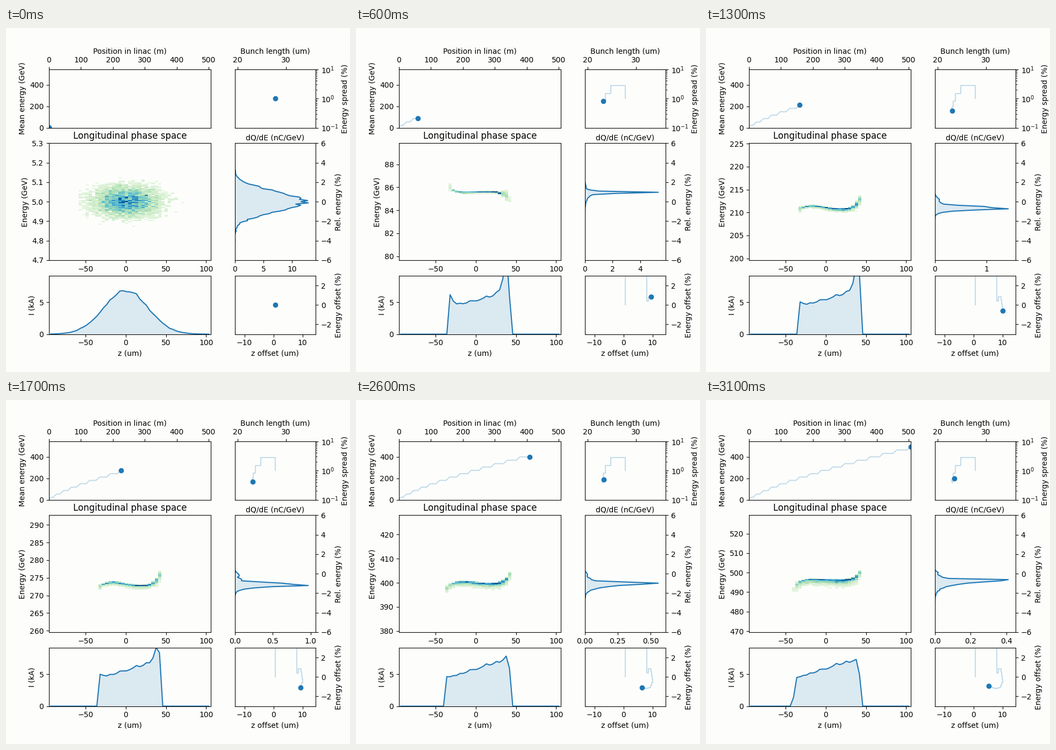
Write a matplotlib script that moves like this. It is 640 by 640 pixels and loops after 3.2 s.

```python
import numpy as np
import matplotlib.pyplot as plt
from matplotlib.animation import FuncAnimation

FRAMES, INTERVAL = 32, 100
BLUE, PAPER = "C0", "#fdfefc"
Z_LIM = (-95.8, 105.6)   # um
NZ, NE = 49, 99          # histogram cells
PARTICLES, CHARGE = 10000, 1.6

z_edges = np.linspace(*Z_LIM, NZ + 1)
rel_edges = np.linspace(-6, 6, NE + 1)
Z = (z_edges[1:] + z_edges[:-1]) / 2
REL = (rel_edges[1:] + rel_edges[:-1]) / 2
SLICE = np.arange(NZ)
RIPPLE = 1 + .025 * np.random.default_rng(3).normal(size=NZ)


def along(x, *points):
    """Straight-line path through (x, y) key points."""
    return np.interp(x, *zip(*points))


# Each stage changes the energy, each drift after it the bunch shape
def stage_of(k):
    return (k + 1) // 2


def drift_of(k):
    return k // 2


def ref_energy(stage):
    return 5 + 31.9 * max(stage - .5, 0)


def position(k):
    cells = 11 * max(stage_of(k) - .5, 0)
    drifts = sum(np.sqrt(ref_energy(n + 1)) for n in range(drift_of(k)))
    return cells + 1.5106 * drifts


def energy_offset(stage):
    return along(stage, (0, 0), (1, 3.6), (2, .4), (3, .84), (4, .5),
                 (7, -.6), (9, -1.1), (11, -1.2), (16, -.95))


def energy_spread(stage):
    return along(stage, (0, 1), (1, 2.8), (2, 1.5), (3, .83), (4, .56),
                 (7, .38), (16, .54))


def z_offset(drift):
    return along(drift, (0, .6), (1, 8.05), (2, 8.5), (3, 9.45), (6, 10.1),
                 (8, 9.35), (10, 8), (13, 6.4), (15, 5.3))


def bunch_length(drift):
    return along(drift, (0, 27.8), (1, 24.8), (2, 23.7), (3, 23.32),
                 (5, 22.98), (15, 23.5))


def widening(stage):
    return along(stage, (0, 7), (1, 3.4), (2, 1.8), (3, 1))


def current(drift):
    """Gaussian at injection, then a ramp with sharp ends and spikes."""
    gauss = 6.75 * np.exp(-(Z / 27.8) ** 2 / 2)
    front = along(drift, (8, 14), (10, 13.64), (13, 13), (15, 12.68))
    body = along(drift, (3, 4.5), (15, 4.9))
    slope = along(drift, (3, .13), (10, .165))
    head = along(drift, (3, 2), (6, .8), (15, .3))
    tail = along(drift, (3, 6.6), (6, 3.8), (8, 2), (10, 1.2), (15, -.2))
    last = along(drift, (3, 5.9), (6, 9.2), (15, 4.9))
    ramp = (body + slope * (SLICE - 17)
            + head * np.exp(-np.abs(SLICE - front - 1))
            + tail * np.exp(-np.abs(SLICE - 32)))
    ramp *= np.clip(SLICE - front, 0, 1) * (SLICE < 33)
    ramp[33] = last
    left = along(drift, (0, 1), (1, .18), (2, .07), (3, 0))
    return RIPPLE * (left * gauss + (1 - left) * ramp)


def sheet(stage):
    """Mean relative energy of each slice: a hump with bent ends."""
    u = np.clip(SLICE, 13, 33)
    level = along(stage, (3, .18), (7, -.25), (9, -.2), (11, -.12), (16, .25))
    hump = along(stage, (3, -.15), (7, .45), (9, .45), (16, .12))
    drop = along(stage, (3, -.95), (7, .45), (9, .7), (16, .5))
    rise = along(stage, (3, -.95), (7, 1), (9, 1.1), (11, 1.08), (16, .77))
    shape = (level + hump * np.exp(-((u - 18) / 6) ** 2)
             - drop * np.exp((14 - u) / 1.5) + rise * np.exp((u - 33) / 1.6))
    return energy_offset(stage) + widening(stage) * shape


def histogram(k):
    stage = stage_of(k)
    if stage == 0:
        pdf = np.exp(-REL[:, None] ** 2 / 2) * np.ones(NZ)
    else:
        ends = np.interp(SLICE, [14, 16, 30, 33], [1, 0, 0, 1])
        ends *= 1.5 / max(stage, 3)
        upper = widening(stage) * (.06 + ends)
        lower = widening(stage) * (.06 + .018 * max(stage - 3, 0) + ends)
        d = REL[:, None] - sheet(stage)
        pdf = np.where(d > 0, np.exp(-(d / upper) ** 2 / 2),
                       np.exp(-np.abs(d) / lower))
    dens = current(drift_of(k)) * pdf / (pdf.sum(axis=0) + 1e-12)
    rng = np.random.default_rng(k + 7)
    return rng.poisson(PARTICLES * dens / dens.sum())


def spectrum(counts, stage):
    rows = counts.sum(axis=1)
    used = np.flatnonzero(rows)
    span = slice(max(used[0] - 1, 0), used[-1] + 2)
    share = .34 * (3 / max(stage, 3)) ** .47 / widening(stage)
    cell = .12 / NE * ref_energy(stage)
    peak = share * CHARGE / cell
    return REL[span], rows[span] / rows.max() * peak, peak


steps = range(FRAMES)
stages = np.array([stage_of(k) for k in steps])
drifts = np.array([drift_of(k) for k in steps])
pos = np.array([position(k) for k in steps])
ref = np.array([ref_energy(n) for n in stages])
off = energy_offset(stages)
mean_e = ref * (1 + off / 100)
z_off, length = z_offset(drifts), bunch_length(drifts)

fig = plt.figure(figsize=(6.4, 6.4), dpi=100, facecolor=PAPER)
grid = fig.add_gridspec(3, 2, width_ratios=[2, 1], height_ratios=[1, 2, 1])
axes = [[fig.add_subplot(grid[r, c], facecolor=PAPER) for c in range(2)]
        for r in range(3)]
(ax_mean, ax_spread), (ax_phase, ax_spec), (ax_cur, ax_off) = axes

ax_mean.set(xlim=(0, pos[-1]), ylim=(0, 1.1 * mean_e[-1]),
            xlabel="Position in linac (m)", ylabel="Mean energy (GeV)")
ax_spread.set(xlim=(.7 * length[0], 1.3 * length[0]), yscale="log",
              ylim=(.1, 10), xlabel="Bunch length (um)",
              ylabel="Energy spread (%)")
ax_phase.set(ylabel="Energy (GeV)", title="Longitudinal phase space")
ax_spec.set(ylim=(-6, 6), xlabel="dQ/dE (nC/GeV)", ylabel="Rel. energy (%)")
ax_cur.set(xlim=Z_LIM, ylim=(0, 9.15), xlabel="z (um)", ylabel="I (kA)")
ax_off.set(xlim=(z_off[0] - length[0] / 2, z_off[0] + length[0] / 2),
           ylim=(-3, 3), xlabel="z offset (um)", ylabel="Energy offset (%)")
for ax in (ax_mean, ax_spread):
    ax.xaxis.tick_top()
for ax in (ax_mean, ax_spread, ax_spec):
    ax.xaxis.set_label_position("top")
for ax in (ax_spread, ax_spec, ax_off):
    ax.yaxis.tick_right()
    ax.yaxis.set_label_position("right")


def area(ax):
    line, = ax.plot([], [], color=BLUE)
    fill, = ax.fill([0, 0, 0], [0, 0, 0], color=BLUE, alpha=.15, lw=0)
    return line, fill


def set_area(parts, x, y, base_x, base_y):
    line, fill = parts
    line.set_data(x, y)
    fill.set_xy(np.column_stack([np.r_[base_x[0], x, base_x[1]],
                                 np.r_[base_y[0], y, base_y[1]]]))


tracks = []
for ax, x, y in ((ax_mean, pos, mean_e),
                 (ax_spread, length, energy_spread(stages)),
                 (ax_off, z_off, off)):
    trail, = ax.plot([], [], color=BLUE, alpha=.25)
    dot, = ax.plot([], [], "o", color=BLUE)
    tracks.append((trail, dot, x, y))

image = ax_phase.imshow(np.zeros((NE, NZ)), cmap="GnBu", vmin=0, vmax=1,
                        origin="lower", aspect="auto", interpolation="nearest")
spec_area, cur_area = area(ax_spec), area(ax_cur)


def update(k):
    for trail, dot, x, y in tracks:
        trail.set_data(x[:k + 1], y[:k + 1])
        dot.set_data(x[k:k + 1], y[k:k + 1])

    counts = histogram(k)
    low, high = .94 * ref[k], 1.06 * ref[k]
    image.set_data(np.ma.masked_less(counts / counts.max(), .08))
    image.set_extent((*Z_LIM, low, high))
    ax_phase.set(xlim=Z_LIM, ylim=(low, high))

    rel, dens, peak = spectrum(counts, stages[k])
    set_area(spec_area, dens, rel, (0, 0), (rel[0], rel[-1]))
    ax_spec.set_xlim(0, 1.1 * peak)

    set_area(cur_area, Z, current(drifts[k]), (Z[0], Z[-1]), (0, 0))
    return []


anim = FuncAnimation(fig, update, frames=FRAMES, interval=INTERVAL,
                     init_func=lambda: update(0), repeat=True, repeat_delay=0)
plt.show()
```
